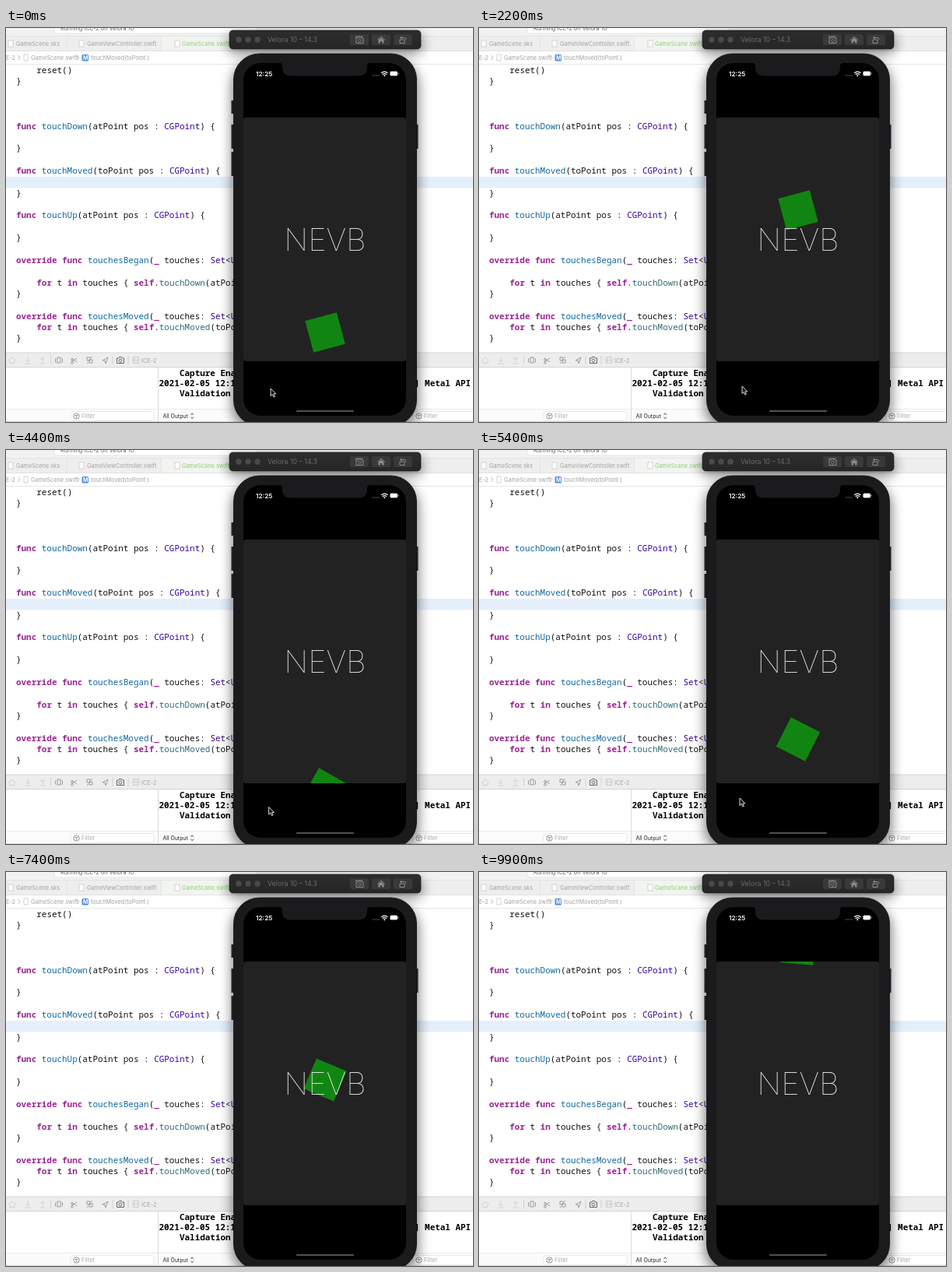
These frames come from a looping animation (600x506 px, 10000 ms). An HTML page:

```html
<!DOCTYPE html>
<html lang="en">
<head>
<meta charset="utf-8">
<title>Spinning box</title>
<style>
html, body { margin: 0; width: 100%; height: 100%; overflow: hidden; background: #fff; }
svg { display: block; width: 600px; height: 506px; }
text { font-family: Inter, "Open Sans", sans-serif; white-space: pre; }
.code text, .log text { font: 500 10.95px "Noto Sans Mono", "DejaVu Sans Mono", monospace; fill: #111; }
.log text { font-weight: 700; fill: #000; }
.code .k { fill: #9b2393; font-weight: 700; }
.code .f { fill: #0f68a0; }
.code .t { fill: #3900a0; }
.code .m { fill: #326d74; }
.ui { font-size: 7.35px; fill: #a2a2a2; }
.icons { fill: none; stroke: #8a8a8a; stroke-width: .8; }
.pale { stroke: #cbcbcb; }
</style>
</head>
<body>
<svg viewBox="0 0 600 506">
  <defs>
    <clipPath id="panel"><rect x="305" y="115" width="209" height="313" rx="3"/></clipPath>
    <filter id="soft" x="-25%" y="-150%" width="150%" height="400%"><feGaussianBlur stdDeviation="8"/></filter>
    <linearGradient id="bar" x1="0" y1="0" x2="0" y2="1">
      <stop offset="0" stop-color="#2d2d2e"/><stop offset="1" stop-color="#262627"/>
    </linearGradient>
  </defs>
  <rect width="600" height="506" fill="#fff"/>

  <!-- editor header -->
  <rect width="600" height="10" fill="#f3f2f3"/>
  <rect x="62" y="-10" width="260" height="17" rx="3" fill="#fff" stroke="#dedede" stroke-width=".8"/>
  <text x="70" y="3" class="ui" style="fill:#666">Running ICE-2 on Velora 10</text>
  <rect y="10" width="600" height="20" fill="#eeeeee"/>
  <rect x="200" y="10" width="100" height="20" fill="#f2f4f0"/>
  <path d="M0 10.500H600M0 29.500H600M78.500 11V29M199.500 11V29" stroke="#e0e0e0" stroke-width=".8"/>
  <g fill="#fff" stroke="#c8c8c8" stroke-width=".8">
    <rect x="3" y="16" width="6" height="8"/><rect x="94" y="16" width="6" height="8"/>
    <rect x="217" y="16" width="6" height="8"/><rect x="23" y="34" width="5" height="8"/>
  </g>
  <text x="13" y="22.800" class="ui">GameScene.sks</text>
  <text x="104" y="22.800" class="ui">GameViewController.swift</text>
  <text x="226" y="22.800" class="ui" style="fill:#8fcf79">GameScane.swift</text>
  <text x="0" y="41" class="ui">E-2</text>
  <text x="32" y="41" class="ui">GameScene.swift</text>
  <text x="109" y="41" class="ui">touchMoved(toPoint:)</text>
  <path d="M15.500 35l2.500 3-2.500 3M91.500 35l2.500 3-2.500 3" fill="none" stroke="#aaa" stroke-width=".8"/>
  <rect x="97.500" y="34" width="8.500" height="8.500" rx="1.500" fill="#4a8be0"/>
  <text x="98.900" y="41" style="font-size:7px;font-weight:700;fill:#fff">M</text>
  <path d="M0 46.500H600" stroke="#e6e6e6"/>

  <rect y="191" width="600" height="14.400" fill="#e5effc"/>
  <g class="code" id="code"></g>

  <!-- debug area -->
  <rect y="417" width="600" height="19" fill="#ededed"/>
  <path d="M0 417H600M0 435.700H600" stroke="#d2d2d2" stroke-width=".9"/>
  <g class="icons">
    <path class="pale" d="M3 427l5-4 5 4M5 427v3.500h6v-3.500M28 422v7m-3-3l3 3 3-3M24 431h8M47 430v-7m-3 3l3-3 3 3M43 431h8"/>
    <path class="pale" d="M57.500 421v11M137 421v11M157 421v11"/>
    <path d="M66 423h4v7h-4zM64.500 424l-1 1v4l1 1M71.500 424l1 1v4l-1 1"/>
    <path d="M84 424l7 5M84 429l7-5M85 424.500a1.400 1.400 0 1 1 -.1 0M85 428.500a1.400 1.400 0 1 1 -.1 0"/>
    <path d="M104 423h4v4h-4zM107 426h4v4h-4zM109 423h2M104 430h2M124 427l7-4-3 8-1-4z"/>
    <path stroke="#444" d="M142.500 424h2l1-1.500h3l1 1.500h2v6.500h-9zM147 425a2 2 0 1 1-.1 0"/>
    <rect class="pale" x="163" y="422.500" width="8" height="8" rx="1"/>
    <path class="pale" d="M165 422v9M169 422v9M163 426.500h8"/>
  </g>
  <text x="174" y="429.500" class="ui">ICE-2</text>
  <path d="M0 489.500H600" stroke="#ececec"/>
  <rect y="490" width="600" height="16" fill="#fbfbfb"/>
  <path d="M195.500 436V506" stroke="#dadada"/>
  <g class="log">
    <text x="223" y="447">Capture Enabled</text>
    <text x="196.500" y="460">2021-02-05 12:14:52.306</text>
    <text x="223" y="473">Validation Enabled</text>
    <text x="525" y="460">] Metal API</text>
  </g>
  <g id="filters"></g>
  <text x="201.500" y="501" class="ui" style="fill:#222;font-size:6.900px">All Output</text>
  <path d="M237.500 497l1.700-2.300 1.700 2.300M237.500 499.500l1.700 2.300 1.700-2.300" fill="none" stroke="#333" stroke-width=".8"/>
  <path d="M0 505.500H600" stroke="#d9d4d4"/>

  <!-- phone -->
  <rect x="290" y="40" width="240" height="478" rx="34" opacity=".5" filter="url(#soft)"/>
  <rect x="286" y="8" width="248" height="24" rx="5" opacity=".5" filter="url(#soft)"/>
  <path d="M289.500 93h5v17h-5zM289.500 124h5v31h-5zM289.500 159h5v31h-5zM525 124h4.500v31H525z" fill="#222224"/>
  <rect x="292.500" y="33" width="235" height="478" rx="33" fill="#1b1b1d" stroke="#111" stroke-width=".8"/>
  <rect x="305" y="45" width="209" height="453" rx="22" fill="#000"/>
  <path d="M350 44.500q5 0 5 5v1q0 11 11 11H453q11 0 11-11v-1q0-5 5-5z" fill="#1b1b1d"/>
  <rect x="287" y="3" width="246" height="24" rx="4.500" fill="url(#bar)" stroke="#151515" stroke-width=".6"/>
  <g fill="#4a4a4c"><circle cx="299" cy="15" r="3.700"/><circle cx="311" cy="15" r="3.700"/><circle cx="323" cy="15" r="3.700"/></g>
  <text x="336" y="18.300" style="font-size:8.800px;fill:#6a6a6c">Velora 10 – 14.3</text>
  <g fill="#39393b">
    <rect x="442" y="8" width="24" height="14" rx="2.500"/><rect x="470" y="8" width="24" height="14" rx="2.500"/>
    <rect x="498" y="8" width="24" height="14" rx="2.500"/>
  </g>
  <g fill="none" stroke="#8c8c8e" stroke-width="1">
    <path d="M449.500 12.500V11h9M450 13h2l1-1.200h3l1 1.200h2v6.500h-9zM454.500 14.200a1.800 1.800 0 1 1-.1 0"/>
    <path d="M477 15.500l5-4.500 5 4.500"/>
    <path d="M506 15h6v4.500h-6zM507 12.500h5q2 0 2 2.500M508.500 10.500l-2 2 2 2"/>
  </g>
  <path d="M478.500 15.500l3.500-3 3.500 3v4h-2.300v-2.500h-2.400v2.500h-2.300z" fill="#8c8c8e"/>
  <text x="321" y="61.800" style="font-size:8.200px;font-weight:600;fill:#fff">12:25</text>
  <g fill="#777"><circle cx="471.500" cy="61" r=".7"/><circle cx="474" cy="61" r=".7"/><circle cx="476.500" cy="61" r=".7"/><circle cx="479" cy="61" r=".7"/></g>
  <path d="M482 57.900q4.300-3.600 8.600 0M483.700 59.800q2.600-2.200 5.200 0" fill="none" stroke="#fff" stroke-width="1.200"/>
  <circle cx="486.300" cy="61.200" r="1" fill="#fff"/>
  <rect x="493.500" y="55.800" width="9.500" height="5.500" rx="1.500" fill="#fff" stroke="#999" stroke-width=".6"/>
  <path d="M504.200 57.500v2" stroke="#aaa"/>

  <g clip-path="url(#panel)">
    <rect x="305" y="115" width="209" height="313" fill="#222222"/>
    <rect id="box" x="-21" y="-21" width="42" height="42" fill="#118511"/>
  </g>
  <text x="410" y="286" text-anchor="middle" style="font-size:40px;font-weight:100;font-family:Inter,Roboto,Lato,sans-serif;fill:#eee">NEVB</text>
  <rect x="373" y="490.700" width="74" height="2.400" rx="1.200" fill="#4e4e4e"/>
  <path id="cursor" d="M0 0V9.500L2.200 7.400 3.800 11 5.400 10.300 3.900 6.900H6.800Z" fill="#111" stroke="#eee" stroke-width=".9"/>
</svg>
<script>
const $ = id => document.getElementById(id);

// Code lines: [row, indent, text]; {k|word} marks a coloured word.
const args = 'atPoint pos : {t|CGPoint}) {';
const lines = [
  [-5, 4, 'reset()'], [-4, 0, '}'],
  [0, 0, '{k|func} {f|touchDown}(' + args], [2, 0, '}'],
  [4, 0, '{k|func} {f|touchMoved}(' + args.replace('at', 'to')], [6, 0, '}'],
  [8, 0, '{k|func} {f|touchUp}(' + args], [10, 0, '}'],
  [12, 0, '{k|override func} {f|touchesBegan}({k|_} touches: {t|Set}<{t|UITouch}>) {'],
  [14, 4, '{k|for} t {k|in} touches { {k|self}.{m|touchDown}(atPoint: t) }'], [15, 0, '}'],
  [17, 0, '{k|override func} {f|touchesMoved}({k|_} touches: {t|Set}<{t|UITouch}>) {'],
  [18, 4, '{k|for} t {k|in} touches { {k|self}.{m|touchMoved}(toPoint: t) }'], [19, 0, '}']
];
$('code').innerHTML = lines.map(([row, indent, s]) => {
  const body = s.replace(/</g, '&lt;').replace(/\{(\w)\|([^}]+)\}/g, '<tspan class="$1">$2</tspan>');
  return `<text x="${13 + indent * 6.57}" y="${129.5 + row * 14.36}">${body}</text>`;
}).join('');

$('filters').innerHTML = [83, 523].map(x => `
  <rect x="${x}" y="492.500" width="107" height="12" rx="2.500" fill="#fff" stroke="#e4e4e4" stroke-width=".8"/>
  <circle cx="${x + 7.5}" cy="498.500" r="3.700" fill="none" stroke="#777" stroke-width=".8"/>
  <path d="M${x + 5.5} 497.500h4M${x + 6.3} 499h2.400M${x + 7} 500.500h1" stroke="#777" stroke-width=".8"/>
  <text x="${x + 14}" y="501.300" class="ui" style="fill:#aaa">Filter</text>`).join('');

// Tenths of a second in which the picture stands still
const held = [3, 4, 5, 6, 7, 8, 9, 59, 70, 72, 75];
// [step, height, angle]: the box rises, leaves at the top and comes back below
const boxKeys = [
  [0, 391, -15], [15, 234, 975], [24, 154.5, 1473], [34, 63, 2043], [35, 450, 2100],
  [47, 371.5, 2637], [64, 267, 3263], [77, 182.5, 3792], [88, 97, 4325]
];
// [step, x, y] of the pointer
const cursorKeys = [
  [0, 340, 463], [2, 338.5, 461], [5, 338, 460], [36, 338, 460], [45, 335, 447],
  [47, 335, 447], [51, 336, 429], [61, 400, 8], [62, 404, 0], [63, 405, -14], [88, 405, -14]
];

function at(keys, s) {
  let i = 1;
  while (i < keys.length - 1 && s > keys[i][0]) i++;
  const a = keys[i - 1], b = keys[i], u = (s - a[0]) / (b[0] - a[0]);
  return a.map((v, j) => v + (b[j] - v) * u);
}

function draw(ms) {
  const tick = Math.floor(ms % 10000 / 100);
  const step = tick - held.filter(h => h <= tick).length;
  const [, y, angle] = at(boxKeys, step);
  $('box').setAttribute('transform', `translate(410 ${y}) rotate(${angle})`);
  const [, cx, cy] = at(cursorKeys, step);
  $('cursor').setAttribute('transform', `translate(${cx} ${cy})`);
}

const start = performance.now();
function loop() {
  draw(performance.now() - start);
  requestAnimationFrame(loop);
}
loop();
</script>
</body>
</html>
```
